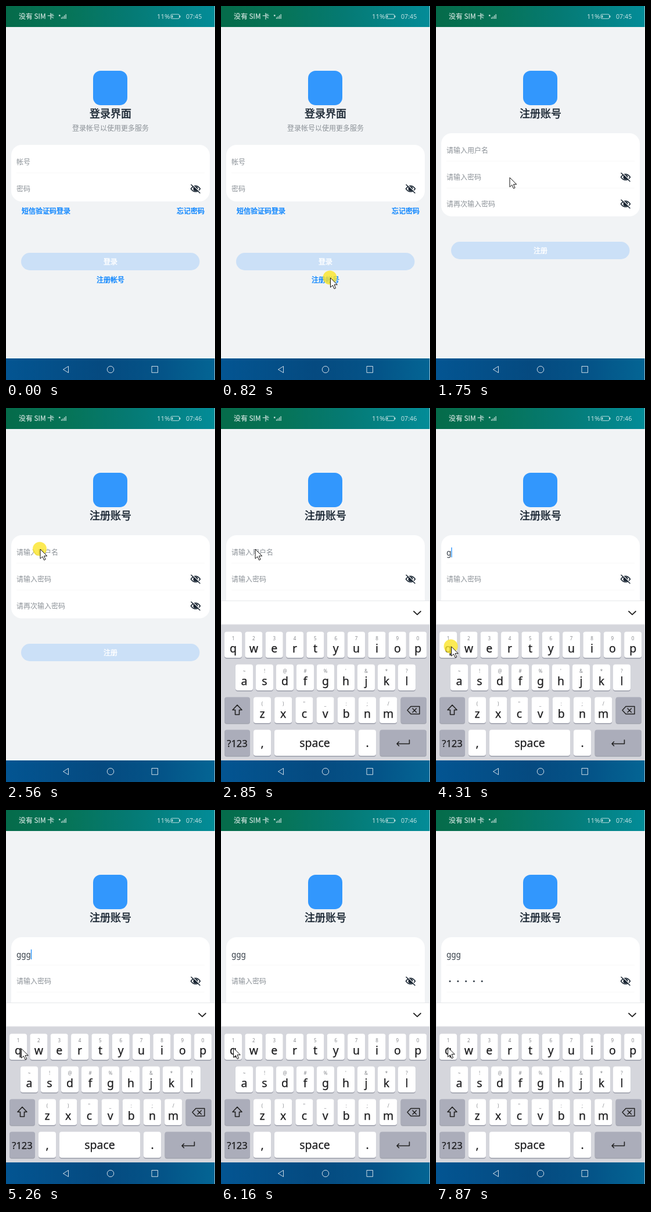
These frames come from a looping animation (360x641 px, 8000 ms). An HTML page:

```html
<!DOCTYPE html>
<html lang="zh-CN">
<head>
<meta charset="utf-8">
<title>注册账号</title>
<style>
html, body { margin: 0; width: 100%; height: 100%; overflow: hidden; background: #f1f3f5; }
svg { display: block; width: 360px; height: 641px; }
text { font-family: "Noto Sans CJK SC", "Noto Sans CJK", sans-serif; white-space: pre; }
.latin text, text.latin { font-family: "Noto Sans", sans-serif; }
</style>
</head>
<body>
<svg id="stage" viewBox="0 0 360 641" xmlns="http://www.w3.org/2000/svg">
  <defs>
    <linearGradient id="top">
      <stop offset="0" stop-color="#056b4a"/><stop offset=".3" stop-color="#067458"/>
      <stop offset=".6" stop-color="#057a74"/><stop offset="1" stop-color="#038c98"/>
    </linearGradient>
    <linearGradient id="bottom">
      <stop offset="0" stop-color="#035592"/><stop offset=".45" stop-color="#054a80"/>
      <stop offset=".75" stop-color="#045488"/><stop offset="1" stop-color="#046594"/>
    </linearGradient>
    <g id="eye" fill="none" stroke="#182431">
      <path d="M-8 0Q-4.500 -5 0 -5T8 0Q4.500 5 0 5T-8 0Z" stroke-width="1.500"/>
      <circle r="4" fill="#182431" stroke="none"/>
      <path d="M-6.500 -7.800L8.500 6.200" stroke="#fff" stroke-width="1.300"/>
      <path d="M-7.500 -7L7.500 7.200" stroke-width="1.500" stroke-linecap="round"/>
    </g>
  </defs>
  <rect width="360" height="641" fill="#f1f3f5"/>
  <rect x="150" y="111" width="59" height="59" rx="13" fill="#3297fd"/>
  <g id="login"></g>
  <g id="signup"></g>
  <g id="keyboard" class="latin"></g>

  <rect width="360" height="36" fill="url(#top)"/>
  <g fill="#fff" fill-opacity=".75">
    <text x="22" y="22" font-size="11.900" stroke="#fff" stroke-opacity=".6" stroke-width=".3">没有 SIM 卡</text>
    <path d="M91 15h2.500v2.500h-2.500zM95 19.500h1.300v2.500h-1.300zM97.500 18h1.300v4h-1.300zM100 16h1.300v6h-1.300zM102.500 14h1.300v8h-1.300z"/>
    <text class="latin" x="260" y="22" font-size="11.400">11%</text>
    <path d="M285.500 16v4h1.800v-4zM299 16.500h1.500v3h-1.500z"/>
    <text class="latin" id="clock" x="310" y="22" font-size="10.700">07:45</text>
  </g>
  <rect x="284" y="14.200" width="14.500" height="7.500" rx="1.800" fill="none" stroke="#fff" stroke-opacity=".7"/>

  <rect y="604" width="360" height="37" fill="url(#bottom)"/>
  <g fill="none" stroke="#fff" stroke-opacity=".8" stroke-linejoin="round">
    <path d="M107.500 617.500L98.500 623L107.500 628.500Z"/>
    <circle cx="180" cy="623" r="5.700"/>
    <rect x="251" y="617.500" width="10.500" height="10.800"/>
  </g>
  <rect x="359.400" width=".6" height="641" fill="#fff"/>

  <circle id="halo" cx="-1" cy="-.5" r="12" fill="#fbe528" fill-opacity=".8"/>
  <path id="mouse" d="M0 0V16.200L3.900 12.700L6.500 18.700L9.100 17.600L6.500 11.700H11.800Z" fill="#fff" stroke="#111" stroke-linejoin="round"/>
</svg>
<script>
const LOOP = 8000;
const $ = id => document.getElementById(id);
const BLUE = '#0a84ff', INK = '#182431', GREY = '#8b9197';

function add(parent, tag, attrs, content) {
  const el = document.createElementNS('http://www.w3.org/2000/svg', tag);
  for (const k in attrs) el.setAttribute(k, attrs[k]);
  if (content) el.textContent = content;
  parent.appendChild(el);
  return el;
}
const label = (parent, x, mid, str, size, fill, opts) =>
  add(parent, 'text', { x, y: mid + size * 0.41, 'font-size': size, fill, ...opts }, str);
// a thin outline gives the weight between regular and bold
const medium = (parent, x, mid, str, size, fill, opts) =>
  label(parent, x, mid, str, size, fill, { stroke: fill, 'stroke-width': 0.45, ...opts });
const centered = { 'text-anchor': 'middle' };
const show = (el, on) => el.setAttribute('visibility', on ? 'visible' : 'hidden');

function card(g, top, height, rows) {
  add(g, 'rect', { x: 9, y: top, width: 342, height, rx: 18, fill: '#fff' });
  return rows.map(([str, eye], i) => {
    const y = top + 29 + i * 46;
    if (i) add(g, 'rect', { x: 18, y: y - 27.5, width: 324, height: 1, fill: '#f7f8f8' });
    if (eye) add(g, 'use', { href: '#eye', x: 326.5, y: y + 0.3 });
    return label(g, 18, y + 0.2, str, 12, GREY);
  });
}
function button(g, top, str) {
  add(g, 'rect', { x: 26, y: top, width: 307.5, height: 30, rx: 15, fill: '#cbe0f7' });
  medium(g, 180, top + 15, str, 12, '#fff', centered);
}

// sign-in page
const login = $('login');
medium(login, 180, 184, '登录界面', 18, INK, centered);
label(login, 180, 209, '登录帐号以使用更多服务', 12, GREY, centered);
card(login, 238, 97, [['帐号'], ['密码', 1]]);
medium(login, 27, 351, '短信验证码登录', 12, BLUE);
medium(login, 294, 351, '忘记密码', 12, BLUE);
button(login, 423, '登录');
medium(login, 180, 469, '注册帐号', 12, BLUE, centered);

// sign-up page
const signup = $('signup');
medium(signup, 180, 184, '注册账号', 18, INK, centered);
const [userHint, passHint] = card(signup, 218, 142.5,
  [['请输入用户名'], ['请输入密码', 1], ['请再次输入密码', 1]]);
button(signup, 404, '注册');
const user = add(signup, 'text', { x: 18, y: 252.5, 'font-size': 13.5, fill: '#343d47', class: 'latin' });
const caret = add(signup, 'rect', { y: 239, width: 1.2, height: 17, fill: BLUE });
const dots = [0, 1, 2, 3, 4].map(i =>
  add(signup, 'circle', { cx: 24 + i * 13.8, cy: 293.5, r: 1.5, fill: '#343d47' }));

// keyboard
const kb = $('keyboard');
add(kb, 'rect', { y: 371, width: 360, height: 233, fill: '#d5d6dc' });
add(kb, 'rect', { x: 0.5, y: 330.5, width: 359, height: 40.5, fill: '#fff', stroke: '#e6e7ea' });
const line = (d, width = 1.6) =>
  add(kb, 'path', { d, fill: 'none', stroke: '#222', 'stroke-width': width, 'stroke-linejoin': 'round', 'stroke-linecap': 'round' });
line('M332 348.5L338 354.2L344 348.5', 1.8);

function key(x, y, w, str, { hint, dark, size = 19.5 } = {}) {
  const ink = '#1c1c1e';
  add(kb, 'rect', { x, y: y + 1.3, width: w, height: 45, rx: 4, fill: '#a4a6b1' });
  add(kb, 'rect', { x, y, width: w, height: 44.5, rx: 4, fill: dark ? '#abadba' : '#fff' });
  const mid = x + w / 2;
  if (hint) label(kb, mid, y + 11.7, hint, 8, '#85878c', centered);
  if (str) add(kb, 'text', {
    x: mid, y: y + (hint ? 35 : 29), 'font-size': size, fill: ink,
    stroke: ink, 'stroke-width': 0.25, ...centered
  }, str);
}
function keyRow(x, y, pitch, keys, hints) {
  [...keys].forEach((k, i) => key(x + i * pitch, y, 30, k, { hint: hints[i] }));
}
keyRow(6, 383.5, 35.35, 'qwertyuiop', '1234567890');
keyRow(25, 439.5, 35, 'asdfghjkl', "~!@#%'&*?");
keyRow(56, 495.5, 36.2, 'zxcvbnm', '()"_:;/');
key(6, 495.5, 44, '', { dark: 1 });
key(309.5, 495.5, 44.5, '', { dark: 1 });
key(6, 551.5, 44, '?123', { dark: 1, size: 16.5 });
key(56, 551.5, 30, ',');
key(92, 551.5, 139, 'space');
key(237, 551.5, 30, '.');
key(273.5, 551.5, 80.5, '', { dark: 1 });
line('M28 509L20 517.5H24.500V525.500H31.500V517.500H36Z');
line('M327 511.500H342V524.500H327L321 518ZM330 515L336.500 521.500M336.500 515L330 521.500', 1.5);
line('M324.500 569V575.500H303M306.500 572L303 575.500L306.500 579');

// pointer stops: time, x, y
const path = [
  [0, 222, 660], [110, 216, 630], [510, 188.5, 466], [1120, 188.5, 466], [1700, 127, 294],
  [1960, 127, 294], [2480, 59, 242], [3000, 59, 242], [3720, 34, 398], [3910, 34, 398],
  [4200, 26.5, 409], [5260, 26.5, 409], [5640, 60, 294], [5780, 60, 294], [6130, 21.5, 408],
  [7690, 21.5, 408], [7870, 20.5, 407], [LOOP, 20.5, 407]
];
const clicks = [[820, 940], [2560, 2720], [4310, 4580], [5640, 5780], [6430, 6860], [7250, 7690]];
const typed = [4310, 4580, 4800];
const masked = [6430, 6860, 7250, 7690, 7870];
const count = (times, t) => times.filter(v => t >= v).length;

function pointer(t) {
  const i = path.findIndex(p => p[0] > t);
  const [t0, x0, y0] = path[i - 1], [t1, x1, y1] = path[i];
  const u = (t - t0) / (t1 - t0), e = u * u * (3 - 2 * u);
  return [x0 + (x1 - x0) * e, y0 + (y1 - y0) * e];
}

function draw(t) {
  const onSignup = t >= 1120;
  login.style.display = onSignup ? 'none' : '';
  signup.style.display = onSignup ? '' : 'none';
  kb.style.display = t >= 2850 ? '' : 'none';
  $('clock').textContent = t >= 2400 ? '07:46' : '07:45';

  const letters = count(typed, t), hidden = count(masked, t);
  user.textContent = 'g'.repeat(letters);
  show(userHint, !letters);
  show(passHint, !hidden);
  dots.forEach((d, i) => show(d, i < hidden));
  caret.setAttribute('x', 18 + letters * 8.3);
  show(caret, t >= 3200 && t < 5640 && (t - 4200) % 1000 < 600);

  const at = `translate(${pointer(t)})`;
  $('mouse').setAttribute('transform', at);
  $('halo').setAttribute('transform', at);
  show($('mouse'), t >= 110);
  show($('halo'), clicks.some(([a, b]) => t >= a && t < b));
}

const start = performance.now();
function tick() {
  draw((performance.now() - start) % LOOP);
  requestAnimationFrame(tick);
}
tick();
</script>
</body>
</html>
```
